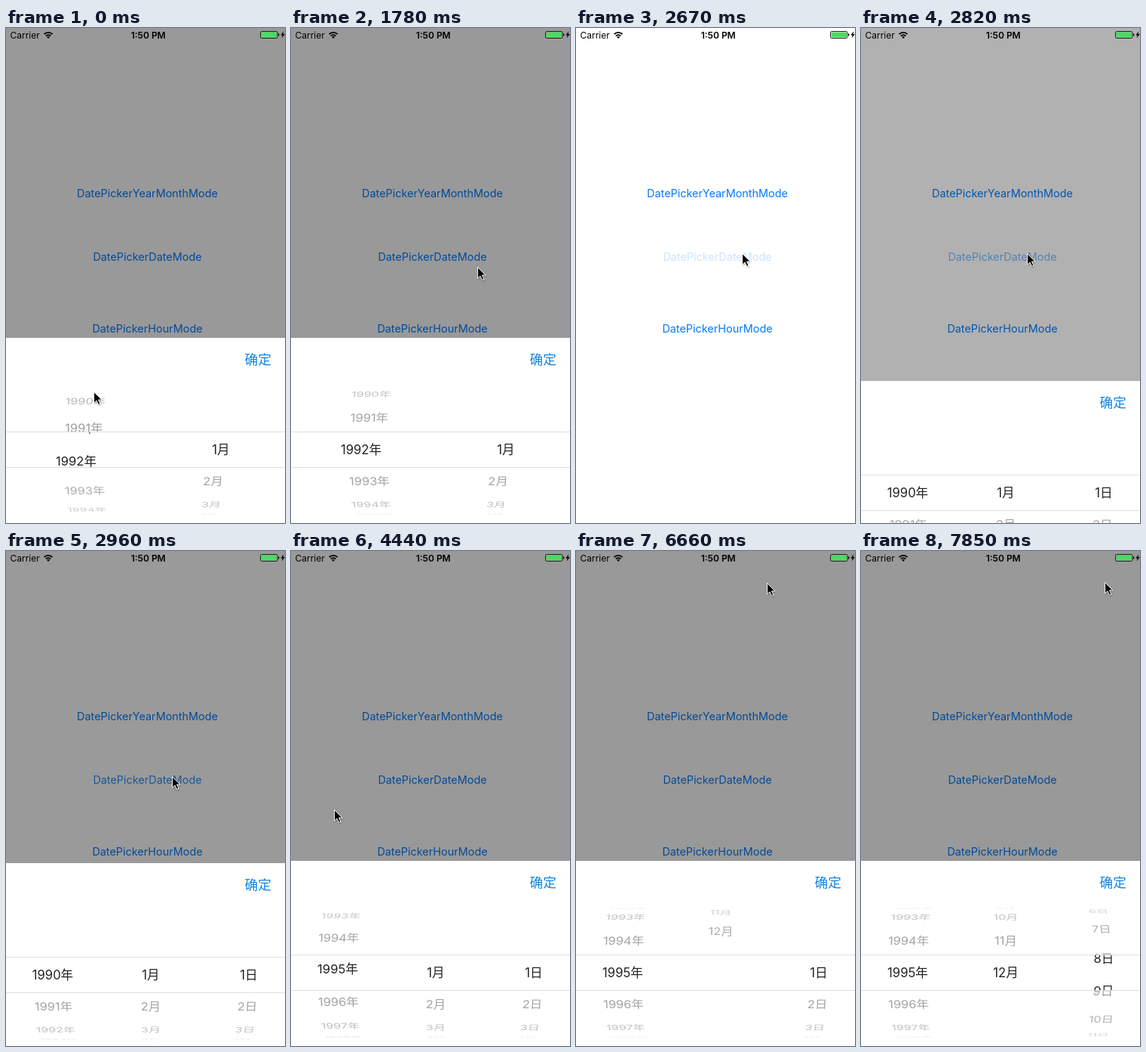
Write an HTML page that moves like this. It is 370 by 655 pixels and loops after 8 s.

```html
<!DOCTYPE html>
<html lang="zh">
<head>
<meta charset="utf-8">
<title>Date picker</title>
<style>
  html, body { margin: 0; width: 100%; height: 100%; overflow: hidden; background: #fff; }
  svg { display: block; width: 100vw; height: 100vh; }
  text { font-family: Inter, "Noto Sans CJK SC", "Noto Sans CJK JP", "Noto Sans CJK", sans-serif; }
  .mid { text-anchor: middle; }
  .link { font-size: 14.4px; fill: #007aff; }
  .row { font-size: 16.6px; }
</style>
</head>
<body>
<svg viewBox="0 0 370 655">
  <defs>
    <clipPath id="outside"><path d="M0 470H370V534H0zM0 582H370V646H0z"/></clipPath>
    <clipPath id="band"><rect y="535" width="370" height="46"/></clipPath>
    <filter id="soft" x="-50%" y="-50%" width="200%" height="200%"><feGaussianBlur stdDeviation="1"/></filter>
  </defs>
  <rect width="370" height="655" fill="#fff"/>
  <text class="mid link" x="187.5" y="223.5">DatePickerYearMonthMode</text>
  <text class="mid link" id="dateLink" x="187.5" y="307.5">DatePickerDateMode</text>
  <text class="mid link" x="187.5" y="402.5">DatePickerHourMode</text>
  <rect id="dim" width="370" height="655"/>

  <g id="status">
    <text x="5.5" y="13.6" font-size="12">Carrier</text>
    <g fill="none" stroke="#000" stroke-width="1.8">
      <path d="M50.6 8.2a7.8 7.8 0 0 1 11 0"/>
      <path d="M52.9 10.5a4.6 4.6 0 0 1 6.4 0"/>
    </g>
    <path d="M56.1 14l-1.9-2a2.7 2.7 0 0 1 3.8 0z"/>
    <text class="mid" x="188.7" y="13.6" font-size="12" font-weight="600">1:50 PM</text>
    <rect x="337.5" y="4.5" width="22.5" height="9" rx="1.8" fill="none" stroke="#222"/>
    <rect x="338.5" y="5.5" width="20.5" height="7" rx="1" fill="#4cd964"/>
    <path d="M361 7.3q1.4 0 1.4 1.7t-1.4 1.7z"/>
    <path d="M368.3 4.3l-4 5.3h2.3l-1 4 4.2-5.5h-2.4z"/>
  </g>

  <g id="panel">
    <rect y="410" width="370" height="260" fill="#fff"/>
    <text class="mid" x="334.2" y="444.5" font-size="17.6" fill="#0f83e0">确定</text>
    <path d="M0 534.5H370M0 581.5H370" stroke="#dedede"/>
    <g id="grey" clip-path="url(#outside)" fill="#999"></g>
    <g id="dark" clip-path="url(#band)" fill="#222"></g>
  </g>

  <g id="cursor">
    <path d="M1 2v15l3.6-3.3 2.6 5.6 2.4-1.1-2.6-5.5h4.9z" opacity=".35" filter="url(#soft)"/>
    <path d="M.6.6v14.6l3.4-3.2 2.5 5.4 2.5-1.1-2.5-5.3h4.6z" stroke="#fff"/>
  </g>
</svg>
<script>
const $ = id => document.getElementById(id);
const LOOP = 8000, TICK = 148, LEAD = 288;
const MID = 558, RADIUS = 85, STEP = 29.6 * Math.PI / 180;
const ROW = RADIUS * STEP, HIDDEN = 245;

const ramp = (n, from, to) => Math.min(1, Math.max(0, (n - from) / (to - from)));
const smooth = p => p * p * (3 - 2 * p);
const easeOut = p => 1 - (1 - p) ** 3;

// Pointer journeys: start tick, end tick, destination.
const moves = [
  [0, 5, 337, 434],
  [8, 10, 247, 316],
  [13, 15, 220, 298],
  [18, 23, 58, 566],
  [24, 28, 57, 342],
  [29, 33, 126, 584],
  [33, 42, 253, 42],
  [44, 48, 318, 590],
  [48, 51, 323, 41]
];

function pointer(n) {
  let x = 116, y = 481;
  for (const [from, to, toX, toY] of moves) {
    const p = smooth(ramp(n, from, to));
    x += (toX - x) * p;
    y += (toY - y) * p;
  }
  return [x, y];
}

// A wheel follows the drag from startY, then springs back to a whole row.
function dragged(n, y, press, release, startY, row) {
  if (n < press) return 0;
  if (n <= release) return Math.max(0, (startY - y) / ROW);
  const over = (startY - y) / ROW - row;
  return row + over * (1 - easeOut(ramp(n, release, release + 3)));
}

// x: centre in the band, gx: centre behind it, bend: inward drift of far rows.
const column = (pos, start, count, unit, x, gx, bend) => ({ pos, start, count, unit, x, gx, bend });

function columns(n) {
  if (n < 15) return [
    column(2 - .34 * (1 - easeOut(ramp(n, -1, 2))), 1990, 60, "年", 93, 103, 7),
    column(0, 1, 12, "月", 285, 275.5, -7)
  ];
  const yearY = pointer(Math.min(n, 28))[1], monthY = pointer(Math.min(n, 43))[1];
  return [
    column(dragged(n, yearY, 23, 28, 566, 5), 1990, 60, "年", 62, 62, 8),
    column(dragged(n, monthY, 33, 43, 584.6, 11), 1, 12, "月", 192, 192, 0),
    column(7.436 * ramp(n, 48, 51) ** 2, 1, 31, "日", 322, 321.3, -9)
  ];
}

function drawWheels(cols) {
  let grey = "", dark = "";
  for (const c of cols) {
    for (let i = Math.max(0, Math.ceil(c.pos - 3.04)); i < c.count && i < c.pos + 3.04; i++) {
      const a = (i - c.pos) * STEP, cos = Math.cos(a), sin = Math.sin(a);
      const y = MID + RADIUS * sin, label = c.start + i + c.unit;
      const x = c.gx + c.bend * (1 - cos), squash = .12 + .88 * cos;
      const m = [1 - .06 * (1 - cos), 0, c.bend * sin / RADIUS, squash, x, y];
      grey += `<text class="mid row" y="6" opacity="${.2 + .8 * cos}" transform="matrix(${m})">${label}</text>`;
      if (cos > .8) dark += `<text class="mid row" y="5.8" transform="translate(${c.x} ${y}) scale(1 ${cos})">${label}</text>`;
    }
  }
  $("grey").innerHTML = grey;
  $("dark").innerHTML = dark;
}

function draw(n) {
  const away = n < 16 ? ramp(n, 12, 14) ** 2 : 1 - easeOut(ramp(n, 16, 18.6));
  $("cursor").setAttribute("transform", `translate(${pointer(n)})`);
  $("panel").setAttribute("transform", `translate(0 ${HIDDEN * away})`);
  $("dim").setAttribute("opacity", .4 * (1 - away));
  $("dateLink").setAttribute("opacity", n < 16 ? 1 : .2 + .8 * ramp(n, 16, 18.5));
  drawWheels(columns(n));
}

let last = null;
function frame(now) {
  const n = Math.max(-1, Math.floor((now % LOOP - LEAD) / TICK));
  if (n !== last) draw(last = n);
  requestAnimationFrame(frame);
}
draw(-1);
requestAnimationFrame(frame);
</script>
</body>
</html>
```
